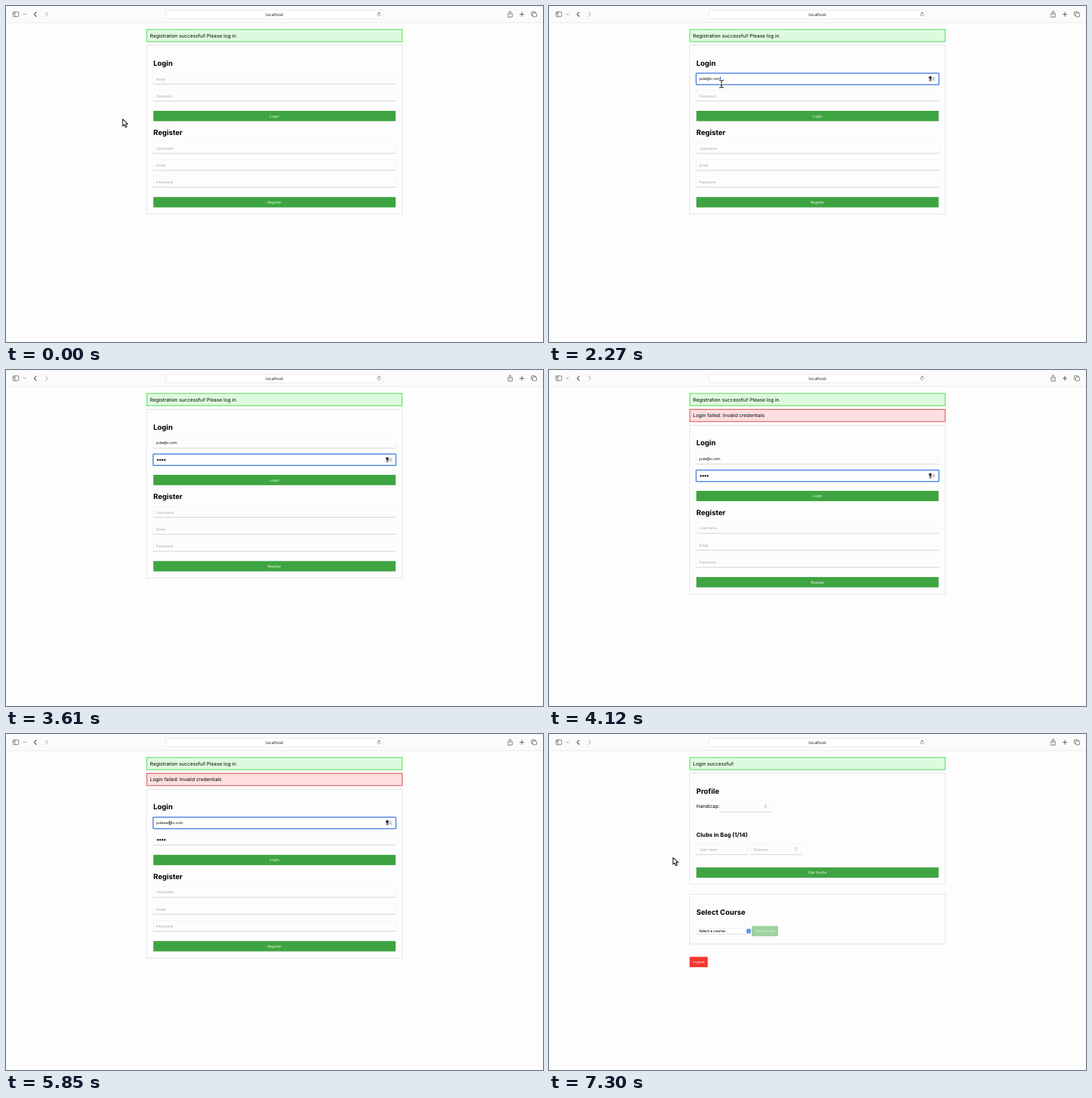
An HTML page that plays this animation: 800x500 px, repeating every 7.82 s.

```html
<!DOCTYPE html>
<html lang="en">
<head>
<meta charset="utf-8">
<title>Login flow</title>
<style>
  html, body { margin: 0; width: 100%; height: 100%; overflow: hidden; background: #fdfdfd; }
  svg { display: block; width: 800px; height: 500px; }
  text { font-family: Inter, "Open Sans", sans-serif; text-rendering: geometricPrecision; white-space: pre; }
</style>
</head>
<body>
<svg id="stage" viewBox="0 0 800 500"></svg>
<script>
const LOOP = 7820;
const SHIFT = 23.8;
const GREEN = '#3ea442';
const stage = document.getElementById('stage');

const text = (x, y, s, size, attrs = '') =>
  `<text x="${x}" y="${y}" font-size="${size}" ${attrs}>${s}</text>`;
const rect = (x, y, w, h, fill, attrs = '') =>
  `<rect x="${x}" y="${y}" width="${w}" height="${h}" fill="${fill}" ${attrs}/>`;
const line = (d, color = '#555', width = 1, attrs = '') =>
  `<path d="${d}" fill="none" stroke="${color}" stroke-width="${width}" stroke-linecap="round" stroke-linejoin="round" ${attrs}/>`;
const group = (id, body) => `<g id="${id}">${body}</g>`;

const heading = (y, s, size = 10.7) => text(219.5, y, s, size, 'font-weight="700"');
const panel = (y, h) => rect(209.5, y, 381, h, '#fdfdfd', 'stroke="#dcdcdc" stroke-width=".8"');
const input = (x, y, w) =>
  rect(x, y, w, 16.3, '#fdfdfd', 'stroke="#f1f1f1" stroke-width=".6"') +
  line(`M${x} ${y + 16.2}h${w}`, '#c4c4c4', 0.7);
const hint = (x, y, s, id = '') => text(x, y, s, 5.3, `fill="#a5a5a5" ${id && `id="${id}"`}`);
const button = (x, y, w, s, fill = GREEN, ink = '#f2faf2') =>
  rect(x, y, w, 15.4, fill) +
  text(x + w / 2, y + 9.6, s, 5.3, `fill="${ink}" text-anchor="middle"`);
const alertBox = (y, s, edge, fill) =>
  rect(209.8, y, 380.4, 18.2, fill, `stroke="${edge}" stroke-width="1.1"`) +
  text(214.6, y + 11.8, s, 7.3);
const spinner = (x, y) =>
  rect(x - 2.2, y - 3.8, 4.4, 7.6, '#f4f4f4', 'rx="1.5"') +
  line(`M${x - 1.2} ${y - 1}l1.2 -1.4l1.2 1.4M${x - 1.2} ${y + 1}l1.2 1.4l1.2 -1.4`, '#999', 0.6);

const toolbar =
  rect(0, 0, 800, 24.6, '#fbfbfb') + line('M0 24.8H800', '#e4e4e4', 0.8) +
  rect(238, 6, 324, 13, '#fff', 'rx="3" stroke="#e2e2e2" stroke-width=".8"') +
  text(400, 14.8, 'localhost', 6.1, 'fill="#222" text-anchor="middle"') +
  rect(10.3, 8.8, 8.6, 7, 'none', 'rx="1.3" stroke="#555" stroke-width=".8"') +
  line('M13.3 8.8v7M11.4 10.6h.8M11.4 12h.8', '#555', 0.7) +
  line('M26 11.6l1.5 1.5l1.5 -1.5', '#555', 0.8) +
  line('M45 9.2l-3 3.2l3 3.2', '#444', 1.1) +
  line('M59 9.2l3 3.2l-3 3.2', '#b9b9b9', 1.1) +
  line('M558.2 12.2a2.4 2.4 0 1 1 -1.2 -1.9M556 8.9l1.4 1.4l-1.6 1.1', '#555', 0.7) +
  line('M749.6 11h-1.6v5.4h6.2v-5.4h-1.6M751.1 13.4v-5.6M749.3 9.4l1.8 -1.8l1.8 1.8', '#555', 0.8) +
  line('M765.6 12.4h6M768.6 9.4v6', '#555', 1) +
  rect(782.6, 8.6, 6, 5.6, '#fbfbfb', 'rx="1" stroke="#555" stroke-width=".8"') +
  rect(784.5, 10.4, 6, 5.6, '#fbfbfb', 'rx="1" stroke="#555" stroke-width=".8"');

const focusRing =
  rect(219.2, 99.9, 361.7, 17, '#fff', 'rx=".8" stroke="#4a80e2" stroke-width="1.5"') +
  rect(564.4, 104, 11.4, 8.8, '#e9e9e9', 'rx="1.5"') +
  '<circle cx="568" cy="106.5" r="2" fill="#222"/>' +
  line('M568 107v4.4M568 109.8h1', '#222', 1.2) +
  line('M571.2 108l1.1 1.1l1.1 -1.1', '#444', 0.8);

const form =
  panel(58.5, 251) + heading(88.6, 'Login') +
  input(219.5, 100, 361) + input(219.5, 125.2, 361) +
  group('ring', focusRing) +
  hint(224, 110.5, 'Email', 'emailHint') + hint(224, 135.7, 'Password', 'passHint') +
  text(224, 110.3, '', 5.3, 'id="email"') +
  group('dots', [0, 1, 2, 3].map(i => `<circle cx="${226.1 + 3.45 * i}" cy="133.7" r="1.3"/>`).join('')) +
  rect(0, 0, 1.1, 7.4, '#2b6be0', 'id="caret" rx=".4"') +
  button(219.5, 156, 361, 'Login') + heading(191.8, 'Register') +
  ['Username', 'Email', 'Password'].map((s, i) =>
    input(219.5, 203.1 + 25.2 * i, 361) + hint(224, 213.6 + 25.2 * i, s)).join('') +
  button(219.5, 284.3, 361, 'Register');

const profile =
  alertBox(34.9, 'Login successful!', '#58d95b', '#defade') +
  panel(58.5, 165) + heading(88.6, 'Profile') +
  text(219.5, 110, 'Handicap:', 7.3) + input(254.8, 99.8, 76) + spinner(322.6, 107.8) +
  heading(152.7, 'Clubs in Bag (1/14)', 8.5) +
  input(219.5, 163.2, 76.5) + hint(224, 173.6, 'Club name') +
  input(300.5, 163.2, 76.5) + hint(305, 173.6, 'Distance') + spinner(368.4, 171.2) +
  button(219.5, 198.5, 361, 'Edit Profile') +
  panel(238.5, 73.8) + heading(268.7, 'Select Course') +
  rect(219.8, 289.2, 81.4, 8.4, '#fff', 'rx="2" stroke="#e3e3e3" stroke-width=".6"') +
  line('M221 297.8H300', '#cfcfcf', 0.5) +
  text(223.2, 295.3, 'Select a course...', 5.3, 'font-weight="500"') +
  rect(294.4, 290.3, 6, 6.2, '#2f76ee', 'rx="1.4"') +
  line('M296.2 292.7l1.2 -1.2l1.2 1.2M296.2 294.1l1.2 1.2l1.2 -1.2', '#fff', 0.7) +
  button(302, 285.6, 39.2, 'Start Round', '#9ed1a0', '#dff1df') +
  button(209.5, 331.6, 27, 'Logout', '#f4372d', '#fff');

const beam = 'M-3 -5.6Q-.4 -5.6 0 -4Q.4 -5.6 3 -5.6M-3 5.6Q-.4 5.6 0 4Q.4 5.6 3 5.6M0 -4V4M-1.6 1.6H1.6';
const cursors =
  group('arrow', '<path d="M.3 .4V10.6L2.7 8.4L4.5 12.6L6.5 11.7L4.7 7.7H8Z" fill="#fff" stroke="#111" stroke-width="1.1" stroke-linejoin="round"/>') +
  group('ibeam', line(beam, '#fff', 2.6) + line(beam, '#333', 1.2)) +
  group('hand', '<path d="M-1.1 6.6V.6Q-1.1 -.7 0 -.7T1.1 .6V4Q2.3 3.3 2.9 4.4Q4.1 3.8 4.6 4.9Q6 4.6 6 6.2V8.4Q6 10 5 11.6H.2Q-.9 9.6 -3 7.4Q-3.7 6.2 -2.7 5.8Q-1.9 5.7 -1.1 6.6Z" fill="#fff" stroke="#111" stroke-width=".9" stroke-linejoin="round"/>' +
    line('M1.1 4v2.4M2.9 4.4v2.2M4.6 4.9v1.8', '#111', 0.6));

stage.innerHTML =
  rect(0, 0, 800, 500, '#fdfdfd') + toolbar +
  group('login',
    alertBox(34.9, 'Registration successful! Please log in.', '#58d95b', '#defade') +
    group('error', alertBox(58.6, 'Login failed: Invalid credentials', '#df5050', '#fddfdf')) +
    group('form', form)) +
  group('profile', profile) + group('cursor', cursors);

const ui = {};
stage.querySelectorAll('[id]').forEach(el => ui[el.id] = el);
const show = (el, on) => el.setAttribute('display', on ? 'inline' : 'none');
const move = (el, x, y) => el.setAttribute('transform', `translate(${x} ${y})`);

const typed = (keys, t) => keys.filter(k => t >= k).length;
const ADDRESS = 'jude@v.com';
const ADDRESS_KEYS = [480, 660, 850, 1120, 1390, 1670, 1760, 1850, 1930, 2000];
const INSERT = 'swiet';
const INSERT_KEYS = [5520, 5680, 5840, 5910, 5940];
const PASS_KEYS = [2670, 2910, 3060, 3270];

// Pointer path: time, x, y
const PATH = [
  [30, 173.5, 168], [330, 257, 116], [2270, 257, 116], [2520, 246, 135],
  [4580, 246, 135], [4820, 252, 121], [5060, 238, 134], [5210, 238, 134],
  [5360, 235, 174], [6210, 235, 174], [6560, 253.3, 186.6], [7120, 253.3, 186.6],
  [7300, 184.5, 183.4]
];

function pointer(t) {
  const next = PATH.findIndex(p => t < p[0]);
  if (next < 1) return next ? PATH[PATH.length - 1].slice(1) : PATH[0].slice(1);
  const [t0, x0, y0] = PATH[next - 1], [t1, x1, y1] = PATH[next];
  const u = (t - t0) / (t1 - t0), e = u * u * (3 - 2 * u);
  return [x0 + (x1 - x0) * e, y0 + (y1 - y0) * e];
}

function pointerKind(x, y, t) {
  if (t >= 7120) return 'arrow';
  if (x < 219.5 || x > 580.5) return 'arrow';
  const within = (a, b) => y >= a && y <= b;
  if (within(156, 171.4)) return 'hand';
  return within(100, 116.6) || within(125.2, 141.6) ? 'ibeam' : 'arrow';
}

function focused(t) {
  if (t < 330 || t >= 6640) return '';
  return t < 2430 || t >= 5210 ? 'email' : 'pass';
}

function render(t) {
  const failed = t >= 3730, done = t >= 6790;
  const shift = failed ? SHIFT : 0;
  show(ui.login, !done);
  show(ui.profile, done);
  show(ui.error, failed);
  move(ui.form, 0, shift);

  const added = typed(INSERT_KEYS, t), count = typed(ADDRESS_KEYS, t);
  const value = ADDRESS.slice(0, Math.min(count, 4)) + INSERT.slice(0, added) + ADDRESS.slice(4, Math.max(count, 4));
  ui.email.textContent = value;
  show(ui.emailHint, !count);
  const dots = typed(PASS_KEYS, t);
  show(ui.passHint, !dots);
  [...ui.dots.children].forEach((dot, i) => show(dot, i < dots));

  const focus = focused(t);
  show(ui.ring, focus);
  move(ui.ring, 0, focus === 'pass' ? 25.2 : 0);
  show(ui.caret, focus === 'email' || (focus === 'pass' && t < 3550));
  if (focus === 'email' && !done) {
    const at = t < 5210 ? count : 4 + added;
    move(ui.caret, 223.9 + (at ? ui.email.getSubStringLength(0, at) : 0), 104.8);
  } else {
    move(ui.caret, 224 + 3.45 * dots, 130);
  }

  const [x, y] = pointer(t);
  const kind = pointerKind(x, y - shift, t);
  const hidden = (t >= 480 && t < 2270) || (t >= 2670 && t < 4580) || (t >= 5520 && t < 6210);
  show(ui.cursor, !hidden);
  move(ui.cursor, x, y);
  for (const k of ['arrow', 'ibeam', 'hand']) show(ui[k], k === kind);
}

const start = performance.now();
function tick() {
  render((performance.now() - start) % LOOP);
  requestAnimationFrame(tick);
}
tick();
</script>
</body>
</html>
```
